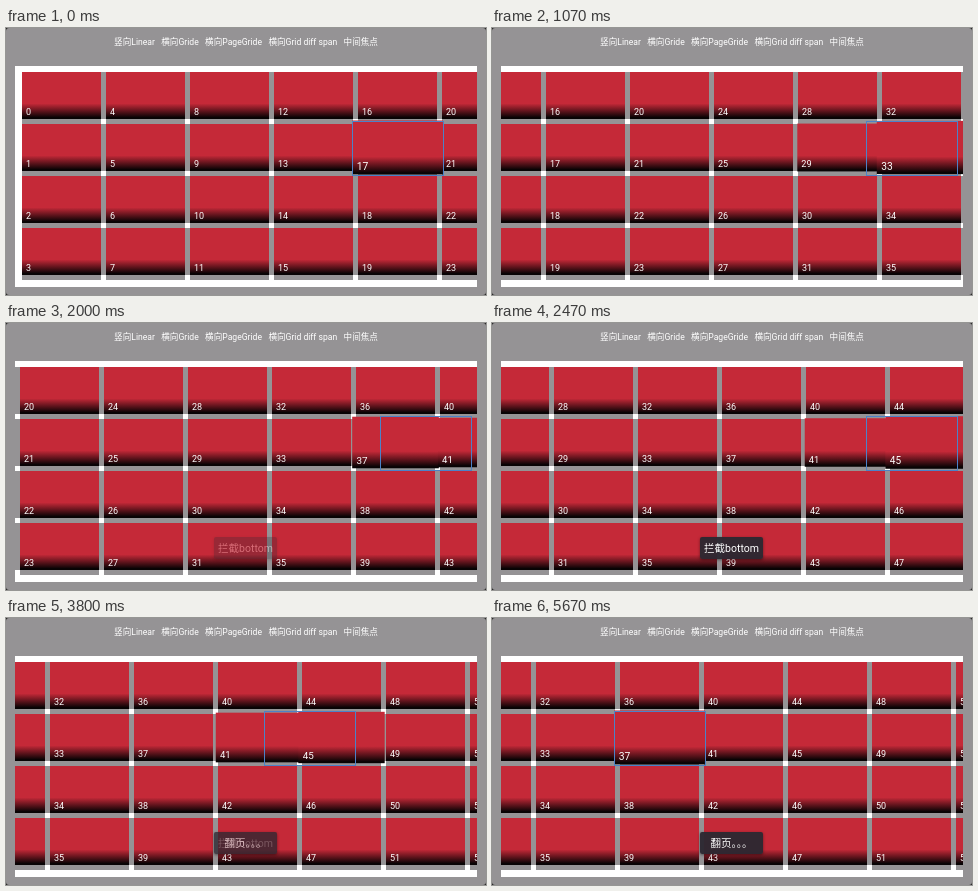
Recreate the animation shown at these times as an HTML page with a canvas. Size 480 px wide and 267 px high, loop 5740 ms.

```html
<!DOCTYPE html>
<html lang="zh">
<head>
<meta charset="utf-8">
<title>Focus grid</title>
<style>
  html, body { margin: 0; width: 100%; height: 100%; overflow: hidden; background: #222; }
  body { font-family: Roboto, "Noto Sans CJK SC", "Noto Sans CJK", sans-serif; color: #fff; }
  #stage { position: relative; width: 480px; height: 267px; overflow: hidden; background: #959395; border-radius: 3px; }
  canvas { position: absolute; left: 0; top: 0; width: 480px; height: 267px; }
  nav { position: absolute; top: 8px; width: 480px; display: flex; justify-content: center; gap: 6.4px;
        font-size: 8.6px; line-height: 12px; white-space: nowrap; }
  .toast { position: absolute; left: 208px; top: 214px; width: 63px; height: 22px; border-radius: 2px;
           background: rgba(44, 40, 49, .96); box-shadow: 0 1px 3px rgba(0, 0, 0, .45);
           font-size: 10.5px; line-height: 23px; text-align: center; white-space: nowrap; opacity: 0; }
</style>
</head>
<body>
<div id="stage">
  <canvas id="grid"></canvas>
  <nav><span>竖向Linear</span><span>横向Gride</span><span>横向PageGride</span><span>横向Grid diff span</span><span>中间焦点</span></nav>
  <div class="toast" id="bottom">拦截bottom</div>
  <div class="toast" id="page">翻页。。。</div>
</div>
<script>
const LOOP = 5740, MOVE = 300;
const CARD_W = 79, CARD_H = 47, GAP = 5, COL = CARD_W + GAP, ROW = CARD_H + GAP;
const LEFT = 16, TOP = 44, ROWS = 4, FOCUS_ROW = 1, GROW = 0.15;
const PANEL = [9, 38, 462, 221];
const GRAY = '#959395';

// Focus changes: start time and the column that receives focus.
const moves = [[-MOVE, 4], [55, 5], [387, 6], [650, 7], [918, 8], [1440, 9], [1960, 10],
  [2350, 11], [2739, 12], [3470, 11], [3757, 10], [4110, 9]].map(([time, col]) => ({ time, col }));
let reach = 0;
for (const m of moves) {
  m.scroll = reach = Math.max(reach, COL * m.col - 364);
  m.x = LEFT + COL * m.col - m.scroll;
}

const canvas = document.getElementById('grid');
const ctx = canvas.getContext('2d');
const dpr = window.devicePixelRatio || 1;
canvas.width = Math.round(480 * dpr);
canvas.height = Math.round(267 * dpr);

const shade = ctx.createLinearGradient(0, 0, 0, CARD_H);
shade.addColorStop(0, '#c52938');
shade.addColorStop(0.67, '#c52938');
shade.addColorStop(0.82, '#67151e');
shade.addColorStop(0.97, '#080304');

const clamp = v => Math.min(1, Math.max(0, v));
const mix = (a, b, p) => a + (b - a) * p;
const easeOut = p => 1 - (1 - clamp(p)) ** 3;

function fill(color, x, y, w, h) {
  ctx.fillStyle = color;
  ctx.fillRect(x, y, w, h);
}

function drawCard(col, row, x, scale) {
  ctx.save();
  ctx.translate(x + CARD_W / 2, TOP + ROW * row + CARD_H / 2);
  ctx.scale(scale, scale);
  ctx.translate(-CARD_W / 2, -CARD_H / 2);
  fill(shade, 0, 0, CARD_W, CARD_H);
  ctx.fillStyle = '#fff';
  ctx.fillText(col * ROWS + row, 4, 43);
  ctx.restore();
}

function drawGrid(t) {
  const i = moves.findLastIndex(m => m.time <= t);
  const to = moves[i], from = moves[Math.max(0, i - 1)];
  const p = easeOut((t - to.time) / MOVE);
  const scroll = Math.round(mix(from.scroll, to.scroll, p));
  const focus = col => col === to.col ? p : col === from.col ? 1 - p : 0;
  const colX = col => LEFT + COL * col - scroll;

  ctx.setTransform(dpr, 0, 0, dpr, 0, 0);
  ctx.clearRect(0, 0, 480, 267);
  ctx.font = '9px Roboto, sans-serif';
  ctx.save();
  ctx.beginPath();
  ctx.rect(...PANEL);
  ctx.clip();
  fill('#fff', ...PANEL);

  const raised = [];
  const first = Math.max(0, Math.floor((scroll - LEFT) / COL));
  for (let col = first; colX(col) < 471; col++) {
    const x = colX(col);
    for (let row = 0; row < ROWS; row++) {
      const y = TOP + ROW * row;
      // Dividers leave the crossings white.
      fill(GRAY, x + CARD_W, y, GAP, CARD_H);
      fill(GRAY, x, y + CARD_H, CARD_W, GAP);
      if (row === FOCUS_ROW && focus(col) > 0) raised.push(col);
      else drawCard(col, row, x, 1);
    }
  }
  for (const col of raised) drawCard(col, FOCUS_ROW, colX(col), 1 + GROW * focus(col));

  ctx.strokeStyle = '#4b82c8';
  ctx.lineWidth = 1;
  ctx.strokeRect(Math.round(mix(from.x, to.x, p)) - 5.5, 93.5, 91, 54);
  ctx.restore();
}

function frame() {
  const t = performance.now() % LOOP;
  drawGrid(t);
  bottom.style.opacity = clamp((t - 1940) / 200) * clamp((3900 - t) / 200);
  page.style.opacity = clamp((t - 3680) / 200);
  requestAnimationFrame(frame);
}
const bottom = document.getElementById('bottom');
const page = document.getElementById('page');
frame();
</script>
</body>
</html>
```
